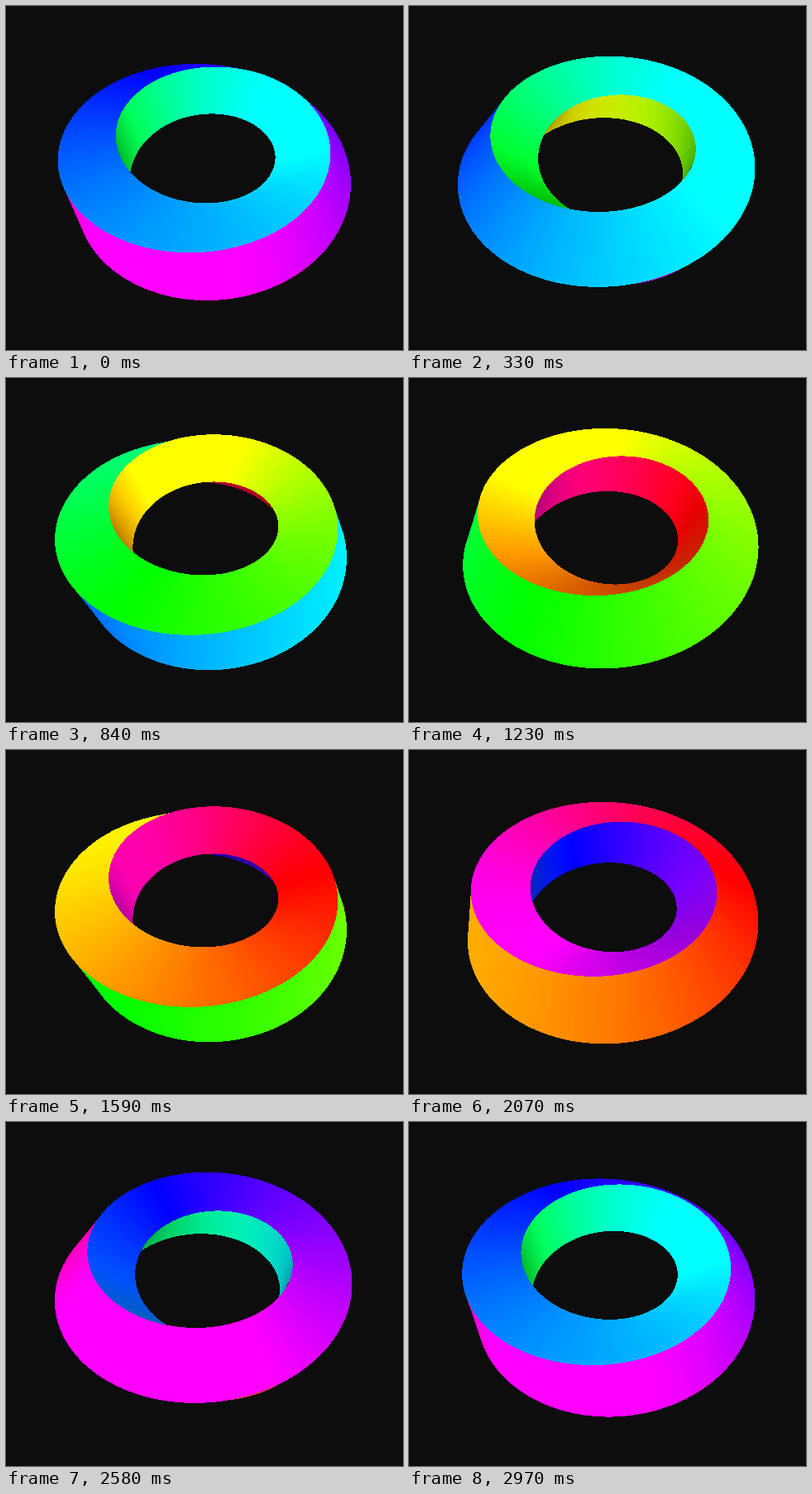
An HTML page with a canvas that plays this animation: 480x416 px, repeating every 3000 ms.

```html
<!DOCTYPE html>
<html lang="en">
<head>
<meta charset="utf-8">
<title>Twisted ring</title>
<style>
html, body { margin: 0; width: 100%; height: 100%; overflow: hidden; background: #0d0d0d; }
canvas { display: block; width: 480px; height: 416px; }
</style>
</head>
<body>
<canvas id="stage" width="480" height="416"></canvas>
<script>
const W = 480, H = 416, LOOP = 3000, TICK = 30;
const ctx = document.getElementById('stage').getContext('2d');
const image = ctx.createImageData(W, H);
const pixels = new Uint32Array(image.data.buffer);

const RAD = Math.PI / 180;
const TILT = 47.1 * RAD, SIN = Math.sin(TILT), COS = Math.cos(TILT);
const FOCAL = 430, DIST = 3.35, CX = 240, CY = 177.4;
const TUBE = 0.352;                  // half diagonal of the square section, ring radius 1
const STEP = 1.5;
const LIGHT = { ambient: 0.76, y: -0.33, z: 0.43 };

const pack = (r, g, b) => (255 << 24 | b << 16 | g << 8 | r) >>> 0;
const BACK = pack(13, 13, 13);

// Section angle: a quarter turn per trip round the ring, a full turn per loop.
const twist = (u, side, t) => 60.6 + (u - 270) / 4 + 90 * side - 360 * t / LOOP;

function corner(u, a) {
  const rho = 1 + TUBE * Math.cos(a * RAD), z = TUBE * Math.sin(a * RAD);
  const x = rho * Math.cos(u * RAD), y = rho * Math.sin(u * RAD);
  const k = FOCAL / (DIST + y * COS - z * SIN);
  return [CX + x * k, CY - (y * SIN + z * COS) * k];
}

function shade(u, side, t) {
  const hue = 225 - (u - 180) / 4 - 90 * side;
  const n = (twist(u, side, t) + 45) * RAD;
  const power = LIGHT.ambient + Math.cos(n) * Math.sin(u * RAD) * LIGHT.y + Math.sin(n) * LIGHT.z;
  const channel = shift => {
    const h = (((hue + shift) % 360) + 360) % 360 / 60;
    const v = Math.max(0, Math.min(1, Math.abs(h - 3) - 1));
    return Math.round(255 * Math.min(1, v * power));
  };
  return pack(channel(0), channel(240), channel(120));
}

function area(p) {
  let sum = 0;
  for (let i = 0; i < 4; i++) {
    const a = p[i], b = p[(i + 1) % 4];
    sum += a[0] * b[1] - b[0] * a[1];
  }
  return sum;
}

function fillQuad(p, color) {
  const ys = p.map(q => q[1]);
  const top = Math.max(0, Math.ceil(Math.min(...ys) - 0.5));
  const end = Math.min(H, Math.ceil(Math.max(...ys) - 0.5));
  for (let y = top; y < end; y++) {
    const mid = y + 0.5;
    let lo = Infinity, hi = -Infinity;
    for (let i = 0; i < 4; i++) {
      const a = p[i], b = p[(i + 1) % 4];
      if ((a[1] <= mid) === (b[1] <= mid)) continue;
      const x = a[0] + (b[0] - a[0]) * (mid - a[1]) / (b[1] - a[1]);
      lo = Math.min(lo, x);
      hi = Math.max(hi, x);
    }
    const from = Math.max(0, Math.ceil(lo - 0.5)), to = Math.min(W, Math.ceil(hi - 0.5));
    if (to > from) pixels.fill(color, y * W + from, y * W + to);
  }
}

function slice(u, t) {
  const v = u + STEP;
  for (let side = 0; side < 4; side++) {
    const a = twist(u, side, t), b = twist(v, side, t);
    const quad = [corner(u, a), corner(u, a + 90), corner(v, b + 90), corner(v, b)];
    if (area(quad) > 0) fillQuad(quad, shade(u + STEP / 2, side, t));
  }
}

function draw(t) {
  pixels.fill(BACK);
  // From the far side to the near side, both ways round.
  for (let s = 0; s < 180; s += STEP) {
    slice(90 + s, t);
    slice(450 - s - STEP, t);
  }
  ctx.putImageData(image, 0, 0);
}

const start = performance.now();
function frame() {
  const t = (performance.now() - start) % LOOP;
  draw(Math.floor(t / TICK) * TICK);
  requestAnimationFrame(frame);
}
frame();
</script>
</body>
</html>
```
